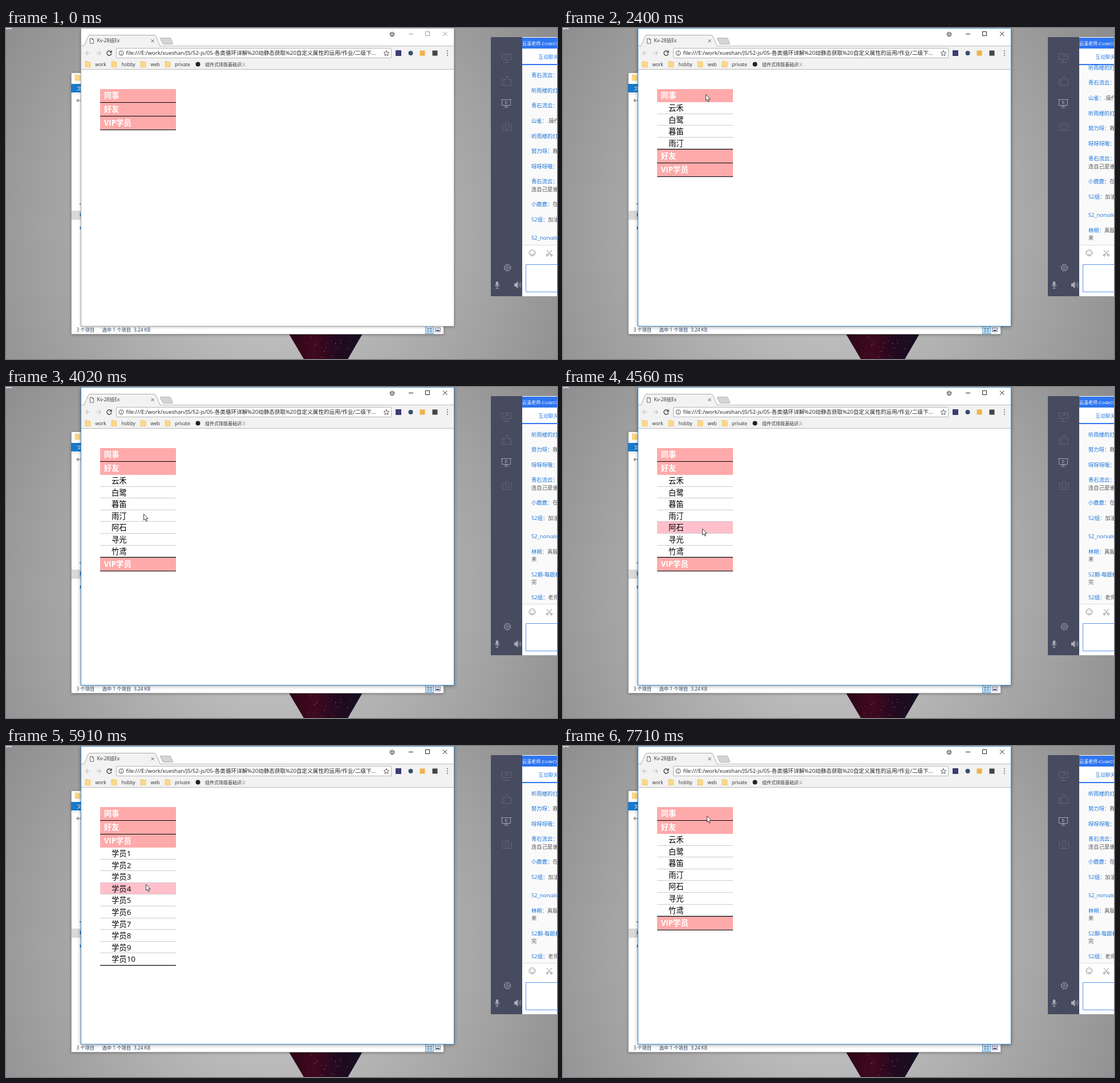
Recreate the animation shown at these times as an HTML page. Size 966 by 580 pixels, loop 8000 ms.

```html
<!DOCTYPE html>
<html lang="zh">
<head>
<meta charset="utf-8">
<title>Menu demo</title>
<style>
html, body { margin: 0; width: 100%; height: 100%; overflow: hidden; }
body {
  position: relative;
  background: radial-gradient(ellipse 640px 700px at 470px 350px, #d0d0d0, #868686);
  font-family: "Open Sans", "Noto Sans CJK SC", "Noto Sans CJK", sans-serif;
}
svg { position: absolute; left: 0; top: 0; display: block; }
svg text { font-size: 8.3px; fill: #333; white-space: pre; }
.line { fill: none; stroke: #555; stroke-width: 1; }
.win { filter: drop-shadow(0 1px 2px rgba(0,0,0,.3)); }
#frame { stroke: #a8a8a8; filter: drop-shadow(0 1px 2px rgba(0,0,0,.3)); }
#controls { stroke: #9a9a9a; }
.focus #frame { stroke: #3a8acb; filter: drop-shadow(0 1px 3px rgba(0,0,0,.4)); }
.focus #controls { stroke: #222; }
.dim { stroke: #626678; }
.lit { stroke: #a0a3ae; }

#menu {
  position: absolute; left: 165px; top: 107px; width: 133px;
  margin: 0; padding: 0; list-style: none; font-size: 13.33px;
}
#menu > li { border-bottom: 1px solid #000; }
#menu b { display: block; height: 23px; line-height: 23px; padding-left: 6.67px; background: #faa; color: #fff; }
#menu div { display: none; }
#menu .open div { display: block; }
#menu p {
  box-sizing: border-box; height: 20.6px; line-height: 20.6px;
  margin: 0; padding-left: 20px; border-bottom: 1px solid #ccc; color: #000;
}
#menu .hover { background: pink; }

#chat { position: absolute; left: 905px; top: 65px; width: 61px; height: 315px; overflow: hidden; background: #fafafa; }
#log { position: absolute; left: 16px; top: -65px; font-size: 9.33px; line-height: 14px; color: #555; white-space: nowrap; }
#log div { position: absolute; left: 0; }
#log span { color: #1a73d9; }
#cursor { width: 9px; height: 14px; overflow: visible; }
</style>
</head>
<body>
<svg width="966" height="580" viewBox="0 0 966 580">
  <defs>
    <linearGradient id="sky"><stop offset="0" stop-color="#2c0616"/><stop offset=".35" stop-color="#40091f"/><stop offset=".65" stop-color="#23091f"/><stop offset="1" stop-color="#141024"/></linearGradient>
    <linearGradient id="fade"><stop offset=".8" stop-color="#333"/><stop offset="1" stop-color="#333" stop-opacity=".35"/></linearGradient>
    <path id="folder" d="M0 0h5l1 1h3v9h-9z" fill="#fcd885" stroke="#e9bd5b" stroke-width=".6"/>
  </defs>

  <path d="M0 2q5-3 10 0" stroke="#eee" stroke-width="1.5" fill="none"/>
  <path d="M496 536H625L561 646Z" fill="url(#sky)"/>
  <g id="stars" fill="#a58ab4"></g>

  <!-- file manager -->
  <rect class="win" x="114.5" y="78.5" width="653" height="458" fill="#fff" stroke="#a2a2a2"/>
  <use href="#folder" x="121" y="82"/>
  <rect x="114" y="98" width="18" height="15" fill="#1979ca"/>
  <text x="124.5" y="108.5" style="fill:#fff">文件</text>
  <path d="M115 115.5h17" stroke="#ddd"/>
  <path class="line" d="M131 127h-7m3-3-3 3 3 3"/>
  <rect x="115" y="320" width="17" height="16" fill="#d9d9d9"/>
  <path d="M129 308h3M130.5 324v6M130.5 348v5" stroke="#2569b3" stroke-width="1.5"/>
  <text x="123.5" y="532" style="fill:#1e395b">3 个项目</text>
  <text x="168.5" y="532" style="fill:#1e395b">选中 1 个项目</text>
  <text x="224" y="532" style="fill:#1e395b">3.24 KB</text>
  <rect x="735.5" y="522.5" width="14" height="13" fill="#cce8ff" stroke="#5ba7dc"/>
  <path d="M738 526.5h4m1 0h4m-9 3h4m1 0h4m-9 3h4m1 0h4" stroke="#567"/>
  <path d="M752.5 525.5h9v7h-9z" fill="#eef" stroke="#889"/>
  <path d="M754 529h6v2h-6z" fill="#357"/>

  <!-- browser -->
  <rect id="frame" x="131.5" y=".5" width="654" height="522" fill="#fff"/>
  <path d="M132 32H785V72H132z" fill="#f2f2f2"/>
  <path d="M132 72.5H785M132 31.5H136M271 31.5H785" stroke="#bbb"/>
  <path d="M135 32q2 0 3-3l6-14q1-2.5 3-2.5H260q2 0 3 2.500l6 14q1 3 3 3" fill="#f2f2f2" stroke="#aaa"/>
  <path d="M271 17.5h16q1.500 0 2 1.500l3.500 8q.5 1.500-1 1.500h-15q-1.500 0-2-1.500l-4-8q-.5-1.500.5-1.500z" fill="#d4d4d4" stroke="#b4b4b4"/>
  <path d="M147.5 18.5h4l2 2v6.500h-6zM151.500 18.500v2h2" fill="#fff" stroke="#555" stroke-width=".9"/>
  <text x="159.5" y="25.3" style="font-size:8.5px">Kv-28班Ex</text>
  <path class="line" d="M254.5 20l5 5m0-5-5 5"/>
  <path class="line" id="controls" d="M706 10.5h8M735.5 6.5h7v7h-7zM766 6.5l7.5 7.5m0-7.5-7.5 7.5"/>
  <circle cx="677" cy="11" r="3.8" fill="#ddd" stroke="#555"/>
  <path d="M673 10h8M675 13h4" stroke="#555"/>
  <path class="line" d="M148 44h-8m3.5-3.5-3.5 3.5 3.5 3.5M158 44h8m-3.5-3.5 3.5 3.5-3.5 3.5" style="stroke:#c4c4c4;stroke-width:1.2"/>
  <path class="line" d="M184 41.5a4 4 0 1 0 .8 3.5M185 39.5v3.3h-3.3" style="stroke:#444;stroke-width:1.4"/>
  <rect x="193.5" y="35.5" width="482" height="17" rx="1.5" fill="#fff" stroke="#b5b5b5"/>
  <circle class="line" cx="202" cy="44" r="4"/>
  <path d="M202 41.5v1M202 43.5v3" stroke="#444"/>
  <text x="210.5" y="47.4" style="font-size:9.6px;fill:#222">file:///E:/work/xueshan/JS/52-js/05-各类循环详解%20动静态获取%20自定义属性的运用/作业/二级下...</text>
  <path class="line" d="M667 39.5l1.4 3 3.2.4-2.4 2.2.7 3.2-2.9-1.6-2.9 1.6.7-3.2-2.4-2.2 3.2-.4z"/>
  <rect x="683" y="39" width="10" height="10" fill="#3c3b72"/>
  <circle cx="709.5" cy="44" r="4" fill="#34506f"/>
  <rect x="725.5" y="39.5" width="9" height="9" fill="#f3b04d"/>
  <rect x="747.5" y="39.5" width="9" height="9" fill="#444"/>
  <path d="M773 40h1.600m-1.600 4h1.600m-1.600 4h1.600" stroke="#444" stroke-width="1.6"/>
  <use href="#folder" x="139" y="58.5"/><text x="156.5" y="66.5">work</text>
  <use href="#folder" x="185" y="58.5"/><text x="202.5" y="66.5">hobby</text>
  <use href="#folder" x="236" y="58.5"/><text x="253.5" y="66.5">web</text>
  <use href="#folder" x="279" y="58.5"/><text x="296" y="66.5">private</text>
  <circle cx="336.5" cy="63.5" r="4" fill="#222"/>
  <text x="349" y="66.5" style="font-size:8px;fill:url(#fade)">组件式排版基础讲义</text>

  <!-- classroom client -->
  <rect x="850" y="16" width="116" height="454" fill="#fff"/>
  <rect x="850" y="16" width="55" height="454" fill="#474b60"/>
  <rect x="905" y="17" width="61" height="19" fill="#2f75f0"/>
  <text x="905" y="30" style="font-size:8px;fill:#fff">云溪老师-CodeClass</text>
  <text x="933.5" y="53.7" style="font-size:8.67px;fill:#2f80e8">互动聊天</text>
  <path d="M905 64h61" stroke="#2f75f0" stroke-width="2"/>
  <g class="line">
    <path class="dim" d="M869.5 45.5h16v10h-16zM877 56v4M872 60.5h11M874 53l6-5m-3 0h3.5v3.5"/>
    <path class="dim" d="M869.5 90.5h6l2-6 3 1v5h5v10h-16zM873 91v9"/>
    <path class="lit" d="M868 125.5h18M869.5 126v9.5h15V126M873 140l3-4m2 0 3 4M877 136v5"/>
    <path class="lit" d="M875.5 128.500v4h2q2-2 0-4z"/>
    <path class="dim" d="M870.5 168.5h4l1.500-2.500h5l1.500 2.500h4v11h-16z"/>
    <circle class="dim" cx="878.5" cy="173.5" r="3.5"/>
    <circle class="lit" cx="879" cy="420" r="6" stroke-dasharray="2.6 2.11"/>
    <circle class="lit" cx="879" cy="420" r="4.8"/>
    <circle class="lit" cx="879" cy="420" r="2"/>
    <path class="lit" d="M857 449.5q0 4 4 4t4-4M861 454v3M858.5 456.5h5"/>
    <path class="lit" d="M899 447q2.5 3 0 6M901 445q4 5 0 10"/>
  </g>
  <rect x="858.8" y="444" width="4.4" height="8" rx="2.2" fill="#a9acb6"/>
  <path d="M891 447.5h2.5l4-3.5v12.5l-4-3.5H891z" fill="#a9acb6"/>
  <path d="M905 380.5h61" stroke="#ddd"/>
  <g class="line" style="stroke:#888">
    <circle cx="922.5" cy="394" r="5.3"/><path d="M919.5 395.5q3 4 6 0M920.5 391.5v1.5M924.5 391.5v1.5"/>
    <path d="M948 389l7 8M957 389l-7 8"/><circle cx="949" cy="398" r="1.6"/><circle cx="956" cy="398" r="1.6"/>
  </g>
  <path d="M970 414.5H911.5v48H970" fill="#fff" stroke="#5a94ea"/>
</svg>

<ul id="menu"></ul>
<div id="chat"><div id="log"></div></div>
<svg id="cursor" viewBox="0 0 9 14"><path d="M.5.5v10.800l2.400-2.200 1.800 4 1.700-.8-1.700-3.800h3.300z" fill="#fff" stroke="#2c2c38" stroke-width=".9"/></svg>

<script>
const LOOP = 8000;
const ROW = 20.6;
const $ = id => document.getElementById(id);

const groups = [
  ['同事', ['云禾', '白鹭', '暮笛', '雨汀']],
  ['好友', ['云禾', '白鹭', '暮笛', '雨汀', '阿石', '寻光', '竹鸢']],
  ['VIP学员', Array.from({ length: 10 }, (_, i) => '学员' + (i + 1))]
];
$('menu').innerHTML = groups.map(([title, names]) =>
  `<li><b>${title}</b><div>${names.map(n => `<p>${n}</p>`).join('')}</div></li>`).join('');
const sections = [...$('menu').children];
const items = sections.map(s => [...s.querySelectorAll('p')]);

// centre height, sender, message
const messages = [
  [83, '青石流云', '好'], [110, '听雨楼的灯', '嗯'], [136.3, '青石流云', '对'],
  [163, '山雀', '.操作'], [189.5, '听雨楼的灯', '嗯'], [216, '努力呀', '救'],
  [242.5, '呀呀呀哦', '哈'], [269.2, '青石流云', '我'], [282.6, '', '连自己是谁'],
  [309.2, '小鹿鹿', '在'], [336, '52组', '加油'], [368, '52_norvalo', '好'],
  [394.5, '林朔', '真服'], [408, '', '来'], [434.5, '52期-每题都', '做'],
  [448, '', '完'], [474.5, '52组', '老师']
];
$('log').innerHTML = messages.map(([y, who, text]) =>
  `<div style="top:${y - 7}px">${who ? `<span>${who}：</span>` : ''}${text}</div>`).join('');

// sparse stars inside the triangle
let seed = 7;
const rnd = () => (seed = seed * 16807 % 2147483647) / 2147483647;
for (let i = 0; i < 26; i++) {
  const y = 539 + rnd() * 40, half = 60 - (y - 537) * .58;
  $('stars').innerHTML += `<circle cx="${561 + (rnd() * 2 - 1) * half}" cy="${y}" r="${.3 + rnd() * .4}"/>`;
}

// start, end, steps, evenly timed points of the pointer
const moves = [
  [750, 1390, 9, [[125, 14], [190, 45], [250, 85], [266, 112], [248, 120]]],
  [1600, 1700, 2, [[249, 118], [250, 116]]],
  [2870, 3640, 11, [[250, 124], [249, 150], [248, 180], [247, 203], [244, 216], [242, 221]]],
  [3740, 3820, 2, [[242, 222], [241, 222]]],
  [4420, 5050, 9, [[242, 232], [244, 248], [245, 272], [244, 294], [243, 304]]],
  [5840, 6380, 8, [[243, 275], [245, 242], [247, 215], [248, 192], [249, 174], [249, 160], [249, 152], [249, 148]]],
  [7160, 7710, 8, [[249, 146], [251, 132], [252, 122]]]
];
const openings = [[0, -1], [2400, 0], [4020, 1], [5440, 2], [6850, 1]];
const scrolls = [[0, 0], [450, 40], [3100, 80], [3820, 106.5]];

const latest = (list, t) => list.filter(e => e[0] <= t).pop();

function pointer(t) {
  const move = latest(moves, t);
  if (!move) return null;
  const [start, end, steps, pts] = move;
  const k = Math.min(steps - 1, Math.floor((t - start) / (end - start) * (steps - 1) + .25));
  const u = k / (steps - 1) * (pts.length - 1);
  const i = Math.min(pts.length - 2, Math.floor(u + 1e-6));
  return pts[i].map((v, axis) => v + (pts[i + 1][axis] - v) * (u - i));
}

function render(t) {
  const pos = pointer(t);
  const [openedAt, open] = latest(openings, t);
  document.body.classList.toggle('focus', t >= 2080);
  $('log').style.transform = `translateY(${-latest(scrolls, t)[1]}px)`;
  $('cursor').style.display = pos ? 'block' : 'none';
  if (pos) $('cursor').style.transform = `translate(${pos[0]}px,${pos[1]}px)`;

  const settled = pos && t - openedAt >= 80;
  const over = settled ? Math.floor((pos[1] - 130 - 24 * open) / ROW) : -1;
  sections.forEach((s, i) => {
    s.classList.toggle('open', i === open);
    items[i].forEach((p, j) => p.classList.toggle('hover', i === open && j === over));
  });
}

const origin = performance.now();
function tick() {
  render((performance.now() - origin) % LOOP);
  requestAnimationFrame(tick);
}
tick();
</script>
</body>
</html>
```
